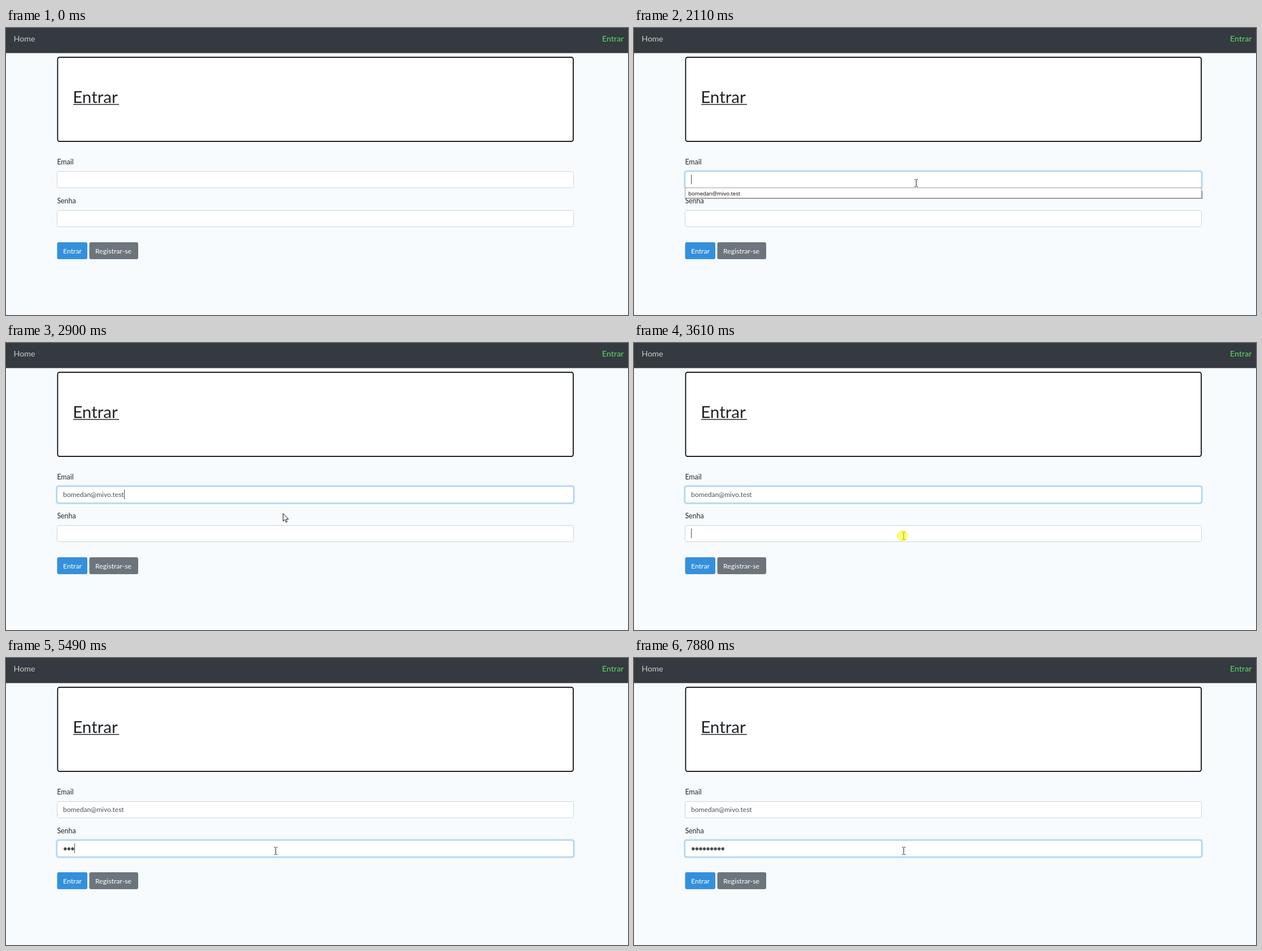
Write an HTML page that moves like this. It is 1101x509 px and loops after 8 s.

```html
<!DOCTYPE html>
<html lang="pt">
<head>
<meta charset="utf-8">
<title>Entrar</title>
<style>
  html, body { margin: 0; width: 100%; height: 100%; overflow: hidden; background: #f7fbfe; }
  svg { display: block; width: 100vw; height: 100vh; }
  text { font: 12.4px Lato, "Open Sans", sans-serif; fill: #212529; }
  .nav { font-size: 14.3px; }
  .title { font-size: 29.6px; }
  .button { font-size: 12.3px; fill: #fff; }
  .value { font-size: 12px; fill: #495057; }
  .option { font: 9.5px "Open Sans", "Noto Sans", sans-serif; fill: #000; }
  .field { fill: #fff; stroke: #ced4da; }
  .ring { fill: none; stroke: #3490dc; stroke-opacity: .25; stroke-width: 2.6; }
  .edge { fill: none; stroke: #a1cbef; }
  .hot rect { fill: #0078d7; }
  .hot text { fill: #fff; }
</style>
</head>
<body>
<svg viewBox="0 0 1101 509" preserveAspectRatio="none">
  <rect width="1101" height="44.5" fill="#343a40"/>
  <text class="nav" x="13.5" y="24" style="fill:#cbcdcf">Home</text>
  <text class="nav" x="1055" y="24" style="fill:#5fdc68">Entrar</text>

  <rect x="91.4" y="51.9" width="912.7" height="149.2" rx="3.5" fill="#fff" stroke="#000" stroke-width="1.7"/>
  <text class="title" x="118.2" y="133">Entrar</text>
  <rect x="119" y="134.8" width="81" height="1.5" fill="#212529"/>

  <text x="90.4" y="242">Email</text>
  <rect class="field" x="90.5" y="254.5" width="914" height="29" rx="3"/>
  <g id="ring1">
    <rect class="ring" x="89.3" y="253.3" width="916.4" height="31.4" rx="4"/>
    <rect class="edge" x="90.5" y="254.5" width="914" height="29" rx="3"/>
  </g>
  <text class="value" id="email" x="101" y="273">bomedan@mivo.test</text>

  <text x="90.4" y="311">Senha</text>
  <rect class="field" x="90.5" y="323.5" width="914" height="29" rx="3"/>
  <g id="ring2">
    <rect class="ring" x="89.3" y="322.3" width="916.4" height="31.4" rx="4"/>
    <rect class="edge" x="90.5" y="323.5" width="914" height="29" rx="3"/>
  </g>
  <g id="dots" fill="#495057"></g>

  <rect x="90.5" y="380" width="53.5" height="30" rx="3" fill="#3490dc"/>
  <text class="button" x="101" y="400">Entrar</text>
  <rect x="147.5" y="380" width="86.5" height="30" rx="3" fill="#6c757d"/>
  <text class="button" x="158" y="400">Registrar-se</text>

  <g id="menu">
    <path d="M93 301.5H1004.5V289H1006.5V303H93z" fill="#9a9a9e"/>
    <g id="option">
      <rect x="90.5" y="283.5" width="914" height="18" fill="#fff" stroke="#a0a0a2"/>
      <text class="option" x="96" y="296.7">bomedan@mivo.test</text>
    </g>
  </g>

  <rect id="caret" width="1" height="17" fill="#495057"/>
  <path id="arrow" d="M.5 .5V14l3.2-2.9 2.1 4.8 2-.9-2.1-4.7H10z" fill="#fff" stroke="#111"/>
  <path id="beam" d="M-2.5-6.5h2l1 1 1-1h2M.5-5.5v11M-2.5 6.5h2l1-1 1 1h2" fill="none" stroke="#222"/>
  <circle id="press" r="10" fill="#ff0" fill-opacity=".55"/>
</svg>
<script>
const LOOP = 8000, STEP = 78, DOT = 6.55;
const ENTER = 470, CLICK = 1640, PICK = 2670, FOCUS = 3610;
const keys = [4930, 5180, 5490, 5800, 6030, 6280, 6760, 7070, 7400];
const $ = id => document.getElementById(id);

// each glide slows down by its own power on either axis
const glides = [
  { from: [912, 499], to: [812, 474], start: ENTER, end: 704, pow: [1, 1] },
  { from: [812, 474], to: [499, 275], start: 852, end: CLICK, pow: [4, 2.5] },
  { from: [499, 275], to: [493, 292], start: 2110, end: 2440, pow: [1, 1] },
  { from: [493, 292], to: [477, 342], start: 2822, end: 3530, pow: [2, 2] }
];

const during = (t, a, b) => t >= a && t < b;
const show = (id, on) => $(id).setAttribute("visibility", on ? "visible" : "hidden");
const place = (id, x, y) => $(id).setAttribute("transform", `translate(${x} ${y})`);
const inField = y => during(y, 254, 284) || during(y, 323, 353);

const dots = keys.map((_, i) => {
  const c = document.createElementNS("http://www.w3.org/2000/svg", "circle");
  c.setAttribute("cx", 104.8 + DOT * i);
  c.setAttribute("cy", 338.5);
  c.setAttribute("r", 2.7);
  return $("dots").appendChild(c);
});

// the pointer is sampled at a fixed step, as a screen recorder would
function pointerAt(t) {
  const g = glides.filter(g => g.start <= t).pop();
  const held = Math.floor((t - g.start) / STEP + 0.05) * STEP;
  const u = t >= g.end ? 1 : Math.min(1, held / (g.end - g.start));
  return g.from.map((a, i) => Math.round(a + (g.to[i] - a) * (1 - (1 - u) ** g.pow[i])));
}

function drawPointer(t) {
  const inside = t >= ENTER;
  const [x, y] = pointerAt(Math.max(t, ENTER));
  const pressed = during(t, CLICK, CLICK + 160) || during(t, PICK, PICK + 80) || during(t, FOCUS, FOCUS + 160);
  show("arrow", inside && !inField(y));
  show("beam", inside && inField(y));
  show("press", pressed);
  place("arrow", x, y);
  place("beam", x, y);
  place("press", x - 1.7, y);
}

function drawCaret(t, typed) {
  const empty = during(t, CLICK, 2200);
  const filled = during(t, 2750, 3250);
  const secret = during(t, FOCUS, 4180) || during(t, 4680, 7880);
  show("caret", empty || filled || secret);
  if (empty) place("caret", 101, 260);
  else if (filled) place("caret", Math.round(101 + $("email").getComputedTextLength()), 260);
  else place("caret", Math.round(101.3 + DOT * typed), 329);
}

function draw(t) {
  const typed = keys.filter(k => k <= t).length;
  const half = during(t, 3680, 3770) ? 0.5 : 1;
  show("ring1", during(t, 1800, 3770));
  show("ring2", t >= 3680);
  $("ring1").setAttribute("opacity", half);
  $("ring2").setAttribute("opacity", half);
  show("menu", during(t, 1710, 2750));
  $("option").classList.toggle("hot", t >= PICK);
  show("email", t >= 2750);
  dots.forEach((d, i) => d.setAttribute("visibility", i < typed ? "visible" : "hidden"));
  drawCaret(t, typed);
  drawPointer(t);
}

const start = performance.now();
function tick(now) {
  draw(Math.max(0, now - start) % LOOP);
  requestAnimationFrame(tick);
}
draw(0);
requestAnimationFrame(tick);
</script>
</body>
</html>
```
